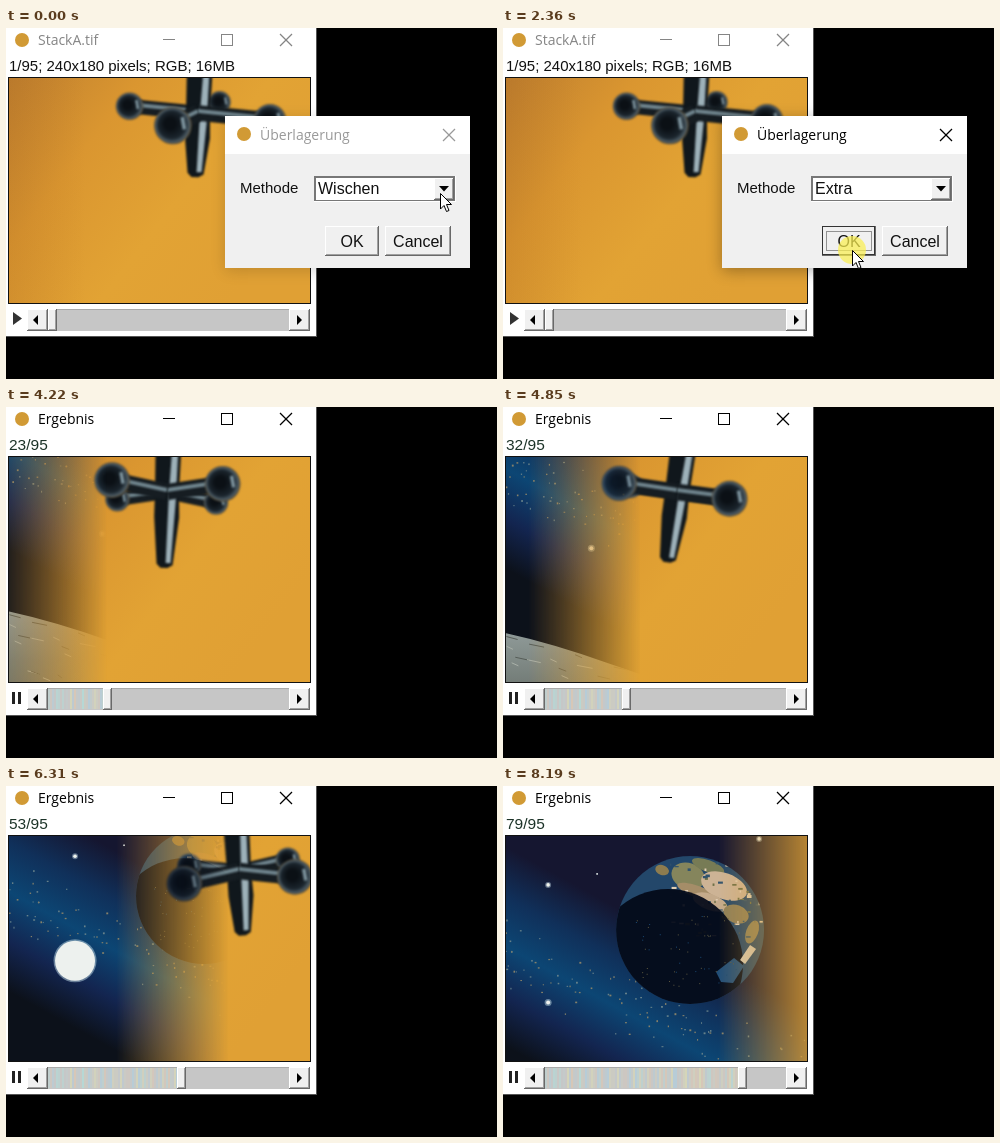
These frames come from a looping animation (491 by 351 pixels, 8.26 s). An HTML page with a canvas:

```html
<!DOCTYPE html>
<html lang="de">
<head>
<meta charset="utf-8">
<title>Überlagerung</title>
<style>
html, body { margin: 0; width: 100%; height: 100%; overflow: hidden; background: #000; }
canvas { display: block; }
</style>
</head>
<body>
<canvas id="stage" width="491" height="351"></canvas>
<script>
const LOOP = 8260, TAU = Math.PI * 2, RAD = Math.PI / 180;
const ctx = document.getElementById('stage').getContext('2d');
const layer = Object.assign(document.createElement('canvas'), { width: 491, height: 351 }).getContext('2d');
const UI = '"Liberation Sans", Arial, sans-serif', TITLE = '"Open Sans", sans-serif';
const METHODS = ['Wischen', 'Blenden', 'Addieren', 'Maximum', 'Minimum', 'Differenz', 'Extra'];
const CLICKS = [130, 1610, 2360, 2710];

// time or slide number followed by the values reached there
const COUNT = [[2780, 2], [3660, 15], [7010, 63], [7840, 74], [8260, 80]];
const CURSOR = [[130, 434, 165], [400, 434, 168], [950, 385, 254], [1140, 360, 270], [1940, 360, 270],
  [2340, 349, 222], [2430, 349, 222], [2690, 9, 290], [3650, 9, 290], [3720, 28, 312], [3790, 75, 338], [3860, 140, 400]];
// slide, centre x, spin, wobble phase
const JACK = [[1, 192, 108, 17], [12, 206, 32, -90], [23, 161, -45, -194], [40, 186, -209, -332],
  [53, 233, -315, -386], [80, 400, -539, -600]];

function along(keys, t) {
  if (t <= keys[0][0]) return keys[0].slice(1);
  for (let i = 1; i < keys.length; i++) {
    const a = keys[i - 1], b = keys[i];
    if (t <= b[0]) return a.slice(1).map((v, j) => v + (b[j + 1] - v) * (t - a[0]) / (b[0] - a[0]));
  }
  return keys[keys.length - 1].slice(1);
}

function random(seed) {
  return () => (seed = (seed * 16807) % 2147483647) / 2147483647;
}

function rect(x, y, w, h, fill, c = ctx) {
  c.fillStyle = fill;
  c.fillRect(x, y, w, h);
}

function disc(x, y, r, fill, c = ctx) {
  c.fillStyle = fill;
  c.beginPath();
  c.arc(x, y, r, 0, TAU);
  c.fill();
}

function poly(points, fill, c = ctx) {
  c.fillStyle = fill;
  c.beginPath();
  points.forEach(p => c.lineTo(...p));
  c.closePath();
  c.fill();
}

function line(x1, y1, x2, y2, color, w = 1, c = ctx) {
  c.strokeStyle = color;
  c.lineWidth = w;
  c.beginPath();
  c.moveTo(x1, y1);
  c.lineTo(x2, y2);
  c.stroke();
}

function text(s, x, y, size, color = '#111', font = UI, align = 'left') {
  ctx.font = `${size}px ${font}`;
  ctx.textAlign = align;
  ctx.fillStyle = color;
  ctx.fillText(s, x, y);
}

function ramp(c, x1, y1, x2, y2, ...stops) {
  const g = c.createLinearGradient(x1, y1, x2, y2);
  stops.forEach((s, i) => g.addColorStop(i / (stops.length - 1), s));
  return g;
}

function raised(x, y, w, h) {
  rect(x, y, w, h, '#696969');
  rect(x, y, w - 1, h - 1, '#fff');
  rect(x + 1, y + 1, w - 2, h - 2, '#a0a0a0');
  rect(x + 1, y + 1, w - 3, h - 3, '#f0f0f0');
}

function cross(x, y, color) {
  line(x - 6, y - 6, x + 6, y + 6, color, 1.2);
  line(x - 6, y + 6, x + 6, y - 6, color, 1.2);
}

function ball(x, y, r) {
  const g = ctx.createRadialGradient(x - r * .15, y - r * .1, r * .3, x, y, r);
  g.addColorStop(0, '#0b1015');
  g.addColorStop(.6, '#1b252d');
  g.addColorStop(.85, '#4b5b65');
  g.addColorStop(1, '#5a4a30');
  disc(x, y, r, g);
  line(x + r * .5, y - r * .45, x + r * .62, y + r * .2, '#7d939d', r * .2);
}

function drawJack(n) {
  const [cx, spin, phase] = along(JACK, n), cy = 85;
  const pitch = .22 * Math.cos(phase * RAD), tilt = .14 * Math.sin(phase * RAD);
  const place = (x, y) => [cx + x - tilt * y, cy + y + tilt * x];
  const arms = [0, 90, 180, 270].map(a => {
    const turn = (spin + a) * RAD, z = Math.sin(turn), reach = 74 * (1 + .08 * z);
    return { z, at: place(reach * Math.cos(turn), reach * pitch * z * .85) };
  }).sort((a, b) => a.z - b.z);
  const drawArm = ({ z, at: [x, y] }) => {
    line(cx, cy, x, y, '#161d22', 15 + 2 * z);
    line(cx, cy - 2, x, y - 2, '#71868f', 4);
    ball(x, y, 15 + 4 * z);
  };
  ctx.filter = 'blur(.8px)';
  arms.slice(0, 2).forEach(drawArm);
  const len = 70 - 28 * pitch;
  poly([place(-13, -50), place(13, -50), place(12, 0), place(13, 25), place(8, len - 3), place(3, len), place(-4, len),
    place(-8, len - 4), place(-12, 25), place(-12, 0)], '#10171c');
  poly([place(4, -50), place(10, -50), place(9, 10), place(6, len - 5), place(1, len - 5), place(2, 0)], '#9db1b9');
  arms.slice(2).forEach(drawArm);
  ctx.filter = 'none';
}

function drawEarth(c, n) {
  const k = n - 53, r = 68 + .23 * k;
  c.save();
  c.translate(198 - .42 * k, 110 + 1.31 * k);
  c.scale(r / 74, r / 74);
  c.beginPath();
  c.arc(0, 0, 74, 0, TAU);
  c.clip();
  rect(-74, -74, 148, 148, '#23476a', c);
  const land = [[-2, -54, 17, 13, '#85855c'], [-28, -60, 7, 5, '#8d7c4f'], [8, -38, 22, 6, '#a58d68'], [18, -64, 17, 6, '#777b55'],
    [34, -44, 24, 13, '#cdb395'], [20, -28, 18, 8, '#c4aa8b'], [46, -16, 13, 9, '#8f8059'], [62, 2, 6, 12, '#8c815c']];
  for (const [x, y, w, h, color] of land) {
    c.fillStyle = color;
    c.beginPath();
    c.ellipse(x, y, w, h, .35, 0, TAU);
    c.fill();
  }
  const rnd = random(11);
  for (let i = 0; i < 70; i++)
    rect(-20 + 90 * rnd(), -68 + 76 * rnd(), 1 + 4 * rnd(), 1 + 2 * rnd(), ['#31536d', '#e2cfb4', '#6d7048'][i % 3], c);
  disc(-22, 34, 75, 'rgba(4,9,24,.93)', c);
  poly([[26, 42], [44, 28], [54, 36], [43, 53], [31, 52]], '#234f78', c);
  poly([[50, 30], [60, 15], [66, 19], [55, 34]], '#d3c8b4', c);
  for (let i = 0; i < 55; i++)
    rect(-55 + 105 * rnd(), -15 + 72 * rnd(), 1, 1, i % 3 ? '#5e5941' : '#1b4a74', c);
  c.restore();
}

function drawSpace(c, n) {
  const k = n - 40, y0 = 72 + 2.1 * k;
  c.clearRect(0, 0, 491, 351);
  rect(0, 0, 310, 300, '#101126', c);
  c.save();
  c.translate(0, y0);
  c.transform(1, .55, 0, 1, 0, 0);
  rect(0, -500, 310, 1000, ramp(c, 0, -95, 0, 105, '#151630', '#10305a', '#0c4674', '#132550', '#0c111a'), c);
  c.restore();

  const rnd = random(5);
  for (let i = 0; i < 150; i++) {
    const x = -20 + 400 * rnd(), spread = (rnd() + rnd() - 1) * 42;
    rect(x - .92 * k, 80 + .4 * x + spread + 1.9 * k, 1 + rnd(), 1 + rnd(), i % 2 ? '#66818a' : '#85806a', c);
  }
  [[81, 56, 1.1], [292, 10, 1.1], [130, 45, 1.1]].forEach(([x, y, v], i) => {
    disc(x - .92 * k, y + v * k, i < 2 ? 3 : 1, 'rgba(190,210,225,.45)', c);
    disc(x - .92 * k, y + v * k, i < 2 ? 1.8 : .8, '#eef2ec', c);
  });
  const flare = 2 + 18 * Math.exp(-(((n - 53) / 5) ** 2));
  const fx = 81 - .92 * k, fy = 154 + 1.6 * k;
  disc(fx, fy, flare + 1.5, 'rgba(190,215,225,.5)', c);
  disc(fx, fy, flare, '#edf1ee', c);
  drawEarth(c, n);

  const top = 148 + 2.42 * n;
  if (top < 280) {
    c.save();
    c.beginPath();
    c.moveTo(0, top);
    c.quadraticCurveTo(50, top + 11, 103, top + 30);
    c.quadraticCurveTo(210, top + 65, 310, top + 120);
    c.lineTo(310, 400);
    c.lineTo(0, 400);
    c.clip();
    rect(0, top, 310, 280, ramp(c, 0, top, 0, top + 100, '#8f9a98', '#747d78', '#666a60'), c);
    for (let i = 0; i < 110; i++) {
      const x = 300 * rnd(), y = top + x * .3 + 110 * rnd();
      line(x, y, x + 4 + 12 * rnd(), y + 3, i % 2 ? '#565d58' : '#a9b0a8', 1, c);
    }
    c.restore();
  }

  // soft edge sweeping to the right
  const edge = 8 + 4.05 * n;
  c.globalCompositeOperation = 'destination-in';
  rect(0, 0, 310, 300, ramp(c, edge - 112, 0, edge, 0, '#000', 'rgba(0,0,0,0)'), c);
  c.globalCompositeOperation = 'source-over';
}

function drawPicture(n, blended) {
  rect(2, 49, 303, 227, '#111');
  ctx.save();
  ctx.beginPath();
  ctx.rect(3, 50, 301, 225);
  ctx.clip();
  rect(3, 50, 301, 225, ramp(ctx, 3, 50, 250, 240, '#c0802f', '#da9630', '#e2a334', '#e0a034'));
  rect(3, 50, 301, 225, ramp(ctx, 3, 0, 80, 0, 'rgba(150,85,25,.15)', 'rgba(150,85,25,0)'));
  drawJack(n);
  if (blended) {
    drawSpace(layer, n);
    ctx.drawImage(layer.canvas, 0, 0);
  }
  ctx.restore();
}

function drawSlider(n, playing) {
  if (playing) {
    rect(6, 285, 3, 12, '#222');
    rect(12, 285, 3, 12, '#222');
  } else poly([[7, 284], [16, 290.5], [7, 297]], '#333');
  rect(21, 281, 283, 22, '#c6c6c6');
  rect(21, 281, 283, 1, '#aaa');
  const x = Math.round(42 + 2.48 * (n - 1)), rnd = random(3);
  for (let s = 42; s < x; s += 2)
    rect(s, 282, 2, 20, `hsl(${[175, 30, 200, 60][Math.floor(rnd() * 4)]},${Math.round(30 * rnd())}%,78%)`);
  raised(21, 281, 21, 22);
  raised(283, 281, 21, 22);
  raised(x, 281, 9, 22);
  poly([[27, 292], [32, 287], [32, 297]], '#000');
  poly([[296, 292], [291, 287], [291, 297]], '#000');
}

function drawWindow(title, info, n, result, playing) {
  const color = result ? '#000' : '#858585';
  rect(0, 0, 311, 309, '#555');
  rect(0, 0, 310, 308, '#fff');
  disc(16, 12, 7, '#d19a35');
  text(title, 32, 17, 14, color, TITLE);
  line(157, 11.5, 169, 11.5, color);
  ctx.strokeRect(215.5, 6.5, 11, 11);
  cross(280, 12, color);
  text(info, 3, 43, result ? 15.5 : 15, result ? '#1c3328' : '#111');
  drawPicture(n, result);
  drawSlider(n, playing);
}

function drawButton(label, x, w) {
  raised(x, 198, w, 30);
  text(label, x + w / 2, 219, 16, '#111', UI, 'center');
}

function drawDialog(t, cursorY) {
  const active = t >= 130, color = active ? '#000' : '#999';
  ctx.save();
  ctx.shadowColor = `rgba(0,0,0,${active ? .3 : .15})`;
  ctx.shadowBlur = 14;
  ctx.shadowOffsetY = 3;
  rect(219, 88, 245, 152, '#f0f0f0');
  ctx.restore();
  rect(219, 88, 245, 38, '#fff');
  disc(238, 106, 7, '#d19a35');
  text('Überlagerung', 254, 112, 14, color, TITLE);
  cross(443, 107, color);
  text('Methode', 234, 165, 15);

  rect(308, 148, 142, 26, '#fff');
  rect(308, 148, 141, 25, '#777');
  rect(310, 150, 138, 22, '#fff');
  raised(428, 150, 20, 22);
  poly([[433, 158], [443, 158], [438, 163.5]], '#000');
  text(t < 1610 ? 'Wischen' : 'Extra', 312, 166, 16);

  drawButton('OK', 319, 54);
  drawButton('Cancel', 379, 66);
  if (t >= 2290) {
    ctx.strokeStyle = '#333';
    ctx.lineWidth = 1;
    ctx.strokeRect(319.5, 198.5, 52, 28);
    ctx.setLineDash([1, 1]);
    ctx.strokeRect(323.5, 203.5, 45, 19);
    ctx.setLineDash([]);
  }

  if (t >= 130 && t < 1610) {
    const row = 16.4, chosen = Math.max(0, Math.min(6, Math.floor((cursorY - 175) / row)));
    rect(308, 174, 142, 117, '#444');
    rect(309, 175, 140, 115, '#fff');
    rect(309, 175 + chosen * row, 140, row, '#0078d7');
    METHODS.forEach((m, i) => text(m, 312, 188.5 + i * row, 16, i === chosen ? '#fff' : '#111'));
  }
}

function drawCursor(t, x, y) {
  if (CLICKS.some(c => t >= c && t < c + 70)) disc(x, y, 14, 'rgba(250,238,80,.72)');
  ctx.save();
  ctx.translate(x + .5, y + .5);
  poly([[0, 0], [0, 15.5], [3.5, 12], [6, 18], [8.5, 17], [6, 11], [11, 11]], '#fff');
  ctx.strokeStyle = '#000';
  ctx.lineWidth = 1;
  ctx.stroke();
  ctx.restore();
}

function draw(t) {
  const [x, y] = along(CURSOR, Math.floor(t / 69.2) * 69.2).map(Math.round);
  rect(0, 0, 491, 351, '#000');
  if (t < 2500) {
    drawWindow('StackA.tif', '1/95; 240x180 pixels; RGB; 16MB', 1, false, false);
    drawDialog(t, y);
  } else {
    const playing = t >= 2780, n = playing ? Math.floor(along(COUNT, t)[0] + .05) : 1;
    drawWindow('Ergebnis', n + '/95', n, true, playing);
  }
  drawCursor(t, x, y);
}

const start = performance.now();
function tick() {
  draw((performance.now() - start) % LOOP);
  requestAnimationFrame(tick);
}
tick();
</script>
</body>
</html>
```
